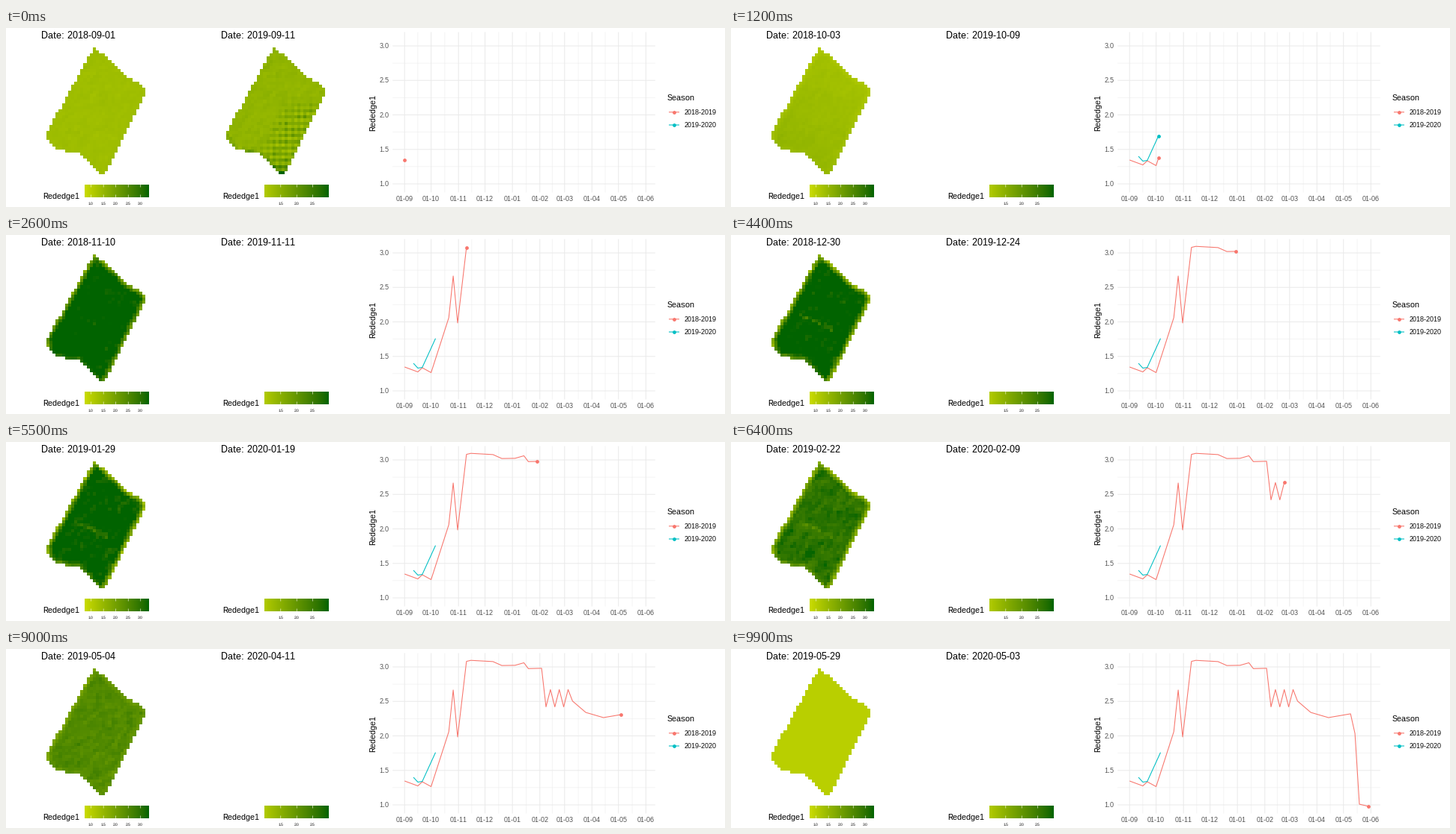
Animation, 960 px wide and 240 px high, one loop 10 s. Source, as a matplotlib script:

```python
import matplotlib.pyplot as plt
import numpy as np
from matplotlib.animation import FuncAnimation
from matplotlib.path import Path

FRAMES, SPAN, SPAN_2 = 100, 270, 235
PT = 0.72  # points per pixel at 100 dpi
RED, TEAL, GRID = "#F8766D", "#00BFC4", "#EBEBEB"
plt.rcParams.update({"font.family": "Liberation Sans", "path.snap": False,
                     "text.hinting": "default", "text.hinting_factor": 1})

# Mean index by day since 1 September: rise, plateau, zigzag, decline
RISE = [(0, 1.346), (15, 1.275), (20, 1.335), (30, 1.265), (50, 2.06),
        (55, 2.665), (60, 1.985), (70, 3.08), (75, 3.095)]
PLATEAU = [(100, 3.077), (110, 3.02), (125, 3.023), (135, 3.06),
           (140, 2.975), (155, 2.98)]
ZIGZAG = [(160 + 5 * n, 2.546 - 0.125 * (-1) ** n) for n in range(6)]
DECLINE = [(190, 2.505), (205, 2.34), (225, 2.265), (250, 2.32),
           (255, 2.035), (260, 1.01), (270, 0.98)]
RED_D, RED_V = np.array(RISE + PLATEAU + ZIGZAG + DECLINE).T
TEAL_D, TEAL_V = np.array([(10, 1.40), (15, 1.33), (20, 1.34), (35, 1.76)]).T

# Field outline in pixels, clockwise from the top
FIELD = [(118, 26), (151, 54), (159, 64), (184.5, 79), (184.5, 91), (132, 195),
         (124, 195), (96, 166), (79, 165), (66, 161.5), (55.5, 149),
         (55.5, 138)]
COLS, ROWS, CELL = 32, 41, 4.125
X0, Y0 = 54, 26.5


def ramp(v, top):
    """Yellow at 0 to dark green at top, blended in Lab."""
    t = np.clip(np.asarray(v, float) / top, 0, 1)
    lum, a, b = 97.1 - 60.9 * t, -21.6 - 21.8 * t, 94.5 - 51.6 * t
    fy = (lum + 16) / 116
    f = np.stack([fy + a / 500, fy, fy - b / 200], -1)
    xyz = np.where(f > 6 / 29, f ** 3, (f - 4 / 29) * 0.12842)
    lin = xyz * [0.9505, 1, 1.089] @ np.array([[3.2406, -0.9689, 0.0557],
                                               [-1.5372, 1.8758, -0.2040],
                                               [-0.4986, 0.0415, 1.0570]])
    lin = np.clip(lin, 0, 1)
    return np.where(lin > 0.0031308, 1.055 * lin ** (1 / 2.4) - 0.055,
                    12.92 * lin)


def edge(points):
    """Closeness to a polyline: 1 on it, 0 about two cells away."""
    best = np.full(cx.shape, 1e9)
    for (x, y), (x2, y2) in zip(points, points[1:]):
        dx, dy = x2 - x, y2 - y
        t = ((cx - x) * dx + (cy - y) * dy) / (dx * dx + dy * dy)
        t = np.clip(t, 0, 1)
        best = np.minimum(best, np.hypot(cx - x - t * dx, cy - y - t * dy))
    return np.clip(1.2 - best / 5.5, 0, 1) * rough


def grain(*shape):
    n = rng.normal(size=shape + cx.shape)
    return (n + np.roll(n, 1, -1) + np.roll(n, 1, -2)) / 3 ** 0.5


rng = np.random.default_rng(7)
cx, cy = np.meshgrid(X0 + CELL * (np.arange(COLS) + 0.5),
                     Y0 + CELL * (np.arange(ROWS) + 0.5))
row, col = np.mgrid[:ROWS, :COLS]
inside = Path(FIELD).contains_points(
    np.c_[cx.ravel(), cy.ravel()]).reshape(cx.shape)
rough = rng.uniform(0.85, 1.15, cx.shape)
left = edge(FIELD[10:] + FIELD[:1])
right = edge(FIELD[:6])
bottom = edge(FIELD[5:11])
fixed, dated = grain(), grain(len(RED_D))
tilt = (cy - 100) / 90 - (cx - 120) / 100
track = np.exp(-((cy - 106 - 0.45 * (cx - 90)) / 2.6) ** 2)
track *= ((cx > 90) & (cx < 138)) * rng.uniform(0.1, 1, cx.shape)

# Woven artefact and dark tip in the lower right of the second field
weave = np.clip((cx - 192 + 0.53 * (cy - 91) + 62) / 25, 0, 1)
weave *= np.clip((cy - 92) / 25, 0, 1) * rng.uniform(0.4, 1.6, cx.shape)
weave *= 0.4 * (row % 2 == 0) + 0.2 * (col % 2) - 0.15
tip = np.clip((cy - 170) / 24, 0, 1) ** 2 * (0.6 + 0.6 * (row % 2 == 0))
rim = 0.4 * bottom * rng.uniform(0, 1.6, cx.shape)
second = 0.04 * fixed + weave + tip + rim


def paint(v, top):
    return np.dstack([ramp(v, top), inside.astype(float)])


def first_map(d):
    mean = np.interp(d, RED_D, RED_V)
    k = max(mean - 1, 0) / 2
    s = np.sin(np.pi * d / SPAN)
    i = min(np.searchsorted(RED_D, d, "right") - 1, len(RED_D) - 2)
    t = (d - RED_D[i]) / (RED_D[i + 1] - RED_D[i])
    noise = 0.6 * (fixed + (1 - t) * dated[i] + t * dated[i + 1])
    fade = np.maximum.reduce([1.8 * abs(s) ** 0.5 * left, 1.9 * s * right,
                              0.9 * s * bottom])
    return paint(mean + 0.45 * k * k + k * (0.18 * noise - fade)
                 + 0.2 * np.exp(-((d - 50) / 25) ** 2) * tilt
                 - 0.9 * s ** 4 * track, 3.34)


def second_map(d):
    mean = np.interp(d + 10, TEAL_D, TEAL_V)
    return paint(mean + second * (1 - 0.6 * d / 25), 3.0)


def px(d):
    return 532.2 + 1.18 * np.asarray(d)


def py(v):
    return 209 - 92.5 * (np.asarray(v) - 1)


fig = plt.figure(figsize=(9.6, 2.4), dpi=100, facecolor="white")
ax = fig.add_axes([0, 0, 1, 1])


def text(x, y, s, size, color="black", **kw):
    return ax.text(x, y, s, fontsize=size * PT, color=color, **kw)


def line(xs, ys, color, width=1.07, z=2):
    return ax.plot(xs, ys, color=color, lw=width * PT, zorder=z,
                   solid_capstyle="butt")[0]


def dot(xs, ys, color):
    return ax.plot(xs, ys, "o", color=color, ms=4.8 * PT, mew=0, zorder=4)[0]


def picture(data, x, y, w, h):
    return ax.imshow(data, extent=(x, x + w, y + h, y), aspect="auto",
                     interpolation="nearest", zorder=1)


def colorbar(x, low, high, ticks):
    w, top, h = 86, 210, 17
    picture(ramp(np.linspace(low, high, w), high)[None]
            if high < 3.1 else ramp(np.linspace(low, high, w), 3.34)[None],
            x, top, w, h)
    text(x - 56, 229, "Rededge1", 11)
    for v in ticks:
        tx = x + w * (v - low) / (high - low)
        for y in (top, top + h - 3.5):
            line([tx, tx], [y, y + 3.5], "white", 0.6)
        text(tx, 237, f"{v:.1f}", 5, ha="center")


# Chart grid and axes
starts = np.arange("2018-09", "2019-07", dtype="datetime64[M]")
months = (starts.astype("datetime64[D]") - np.datetime64("2018-09-01")).astype(int)
levels = np.arange(1, 3.1, 0.5)
for marks, width in ((months, 1.07), ((months[1:] + months[:-1]) / 2, 0.53)):
    for x in px(marks):
        line([x, x], [5.5, 220.4], GRID, width, 1)
for marks, width in ((levels, 1.07), (levels[:-1] + 0.25, 0.53)):
    for y in py(marks):
        line([516.2, 866.8], [y, y], GRID, width, 1)
for d, month in zip(months, starts):
    text(px(d), 232.3, f"01-{str(month)[-2:]}", 9, "#4D4D4D", ha="center")
for v in levels:
    text(511.3, py(v) + 3.2, f"{v:.1f}", 9, "#4D4D4D", ha="right")
text(493, 113, "Rededge1", 11, rotation=90, ha="center", va="baseline",
     rotation_mode="anchor")

# Legends
text(883, 97, "Season", 11)
for y, name, color in ((112.8, "2018-2019", RED), (130, "2019-2020", TEAL)):
    line([885, 899], [y, y], color)
    dot([892], [y], color)
    text(906, y + 3.2, name, 9)
colorbar(105, 0.74, 3.34, levels)
colorbar(345, 0.99, 3.0, levels[1:4])

maps = [picture(first_map(0), X0 + dx, Y0, COLS * CELL, ROWS * CELL)
        for dx in (0, 240)]
titles = [text(x, 14, "", 13) for x in (47, 287)]
series = [(RED_D, RED_V, line([], [], RED), dot([], [], RED)),
          (TEAL_D, TEAL_V, line([], [], TEAL, z=3), dot([], [], TEAL))]

ax.set_xlim(0, 960)
ax.set_ylim(240, 0)
ax.axis("off")


def steps(days):
    """Step at which each observation is reached."""
    return np.round(days * (FRAMES - 1) / SPAN)


def reveal(i, days, vals, path, head):
    at = steps(days)
    seen = at <= i
    xs, ys = days[seen], vals[seen]
    if at[0] <= i <= at[-1]:
        xs = np.append(xs, np.interp(i, at, days))
        ys = np.append(ys, np.interp(i, at, vals))
        head.set_data(px(xs[-1:]), py(ys[-1:]))
    else:
        head.set_data([], [])
    path.set_data(px(xs), py(ys))


def update(i):
    d, d2 = (span * i / (FRAMES - 1) for span in (SPAN, SPAN_2))
    for title, start, n in zip(titles, ("2018-09-01", "2019-09-11"), (d, d2)):
        title.set_text(f"Date: {np.datetime64(start) + int(n + 1e-6)}")
    maps[0].set_data(first_map(np.interp(i, steps(RED_D), RED_D)))
    maps[1].set_visible(round(d2) <= 26)
    maps[1].set_data(second_map(min(d2, 25)))
    for s in series:
        reveal(i, *s)
    return []


anim = FuncAnimation(fig, update, frames=FRAMES, interval=100, repeat=True,
                     repeat_delay=0, init_func=lambda: update(0))
plt.show()
```
